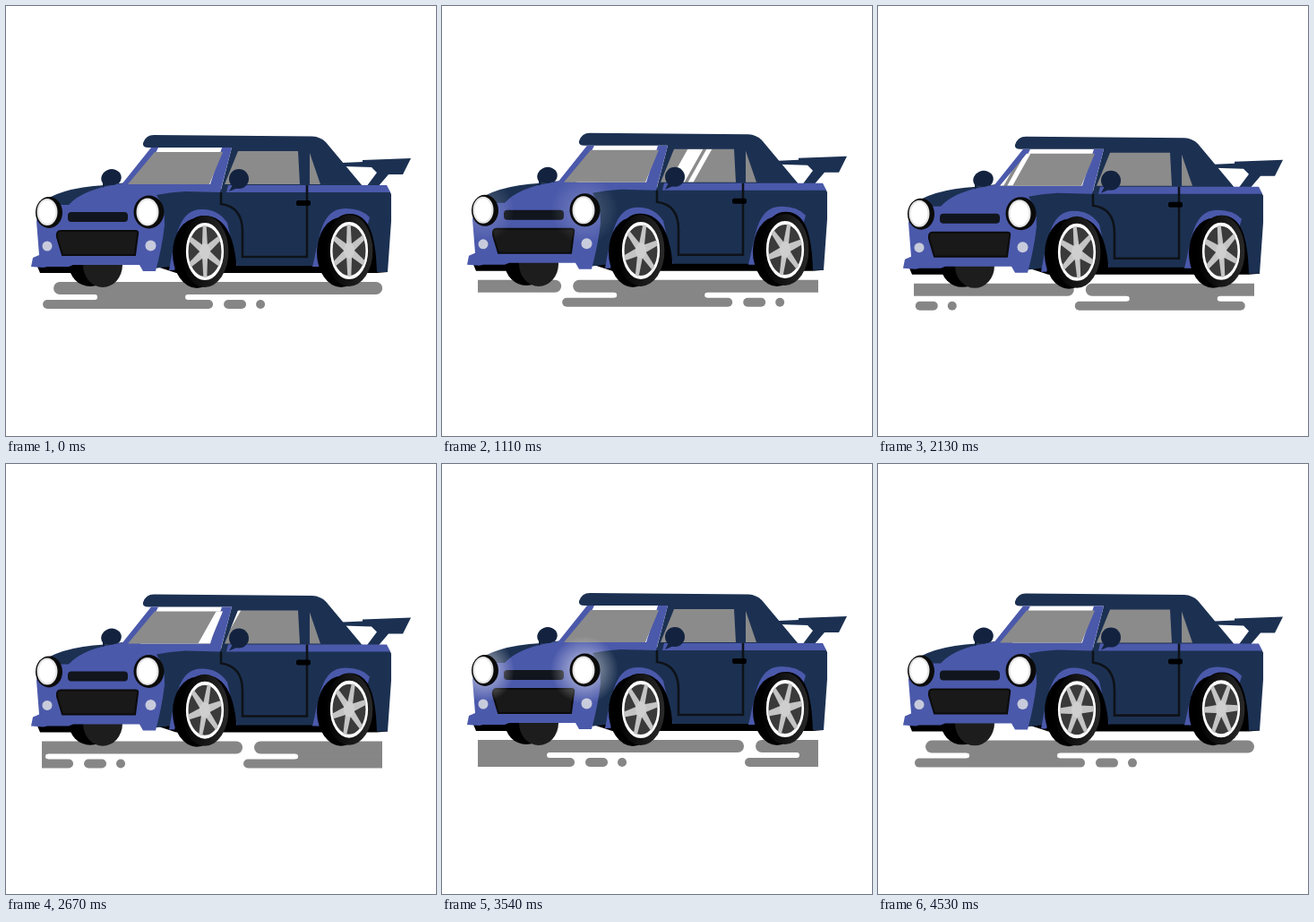
These frames come from a looping animation (480x480 px, 4560 ms). An HTML page:

```html
<!DOCTYPE html>
<html>
<head>
<meta charset="utf-8">
<style>
  html, body { margin: 0; width: 100%; height: 100%; overflow: hidden; background: #fff }
  svg { display: block; width: 100vw; height: 100vh }
  .navy { fill: #1c3152 }
  .deep { fill: #13233f }
  .blue { fill: #4b59ab }
  .glass { fill: #8b8b8b }
  .line { fill: none; stroke: #0e1218; stroke-width: 2.6 }
</style>
</head>
<body>
<svg viewBox="0 0 480 480">
  <defs>
    <clipPath id="road"><path d="M40 300H420V345H40Z"/></clipPath>
    <clipPath id="panes">
      <path d="M166 163H242L227 199H136Z M259 162H326L328 199H244Z"/>
    </clipPath>
    <radialGradient id="beam">
      <stop offset="0" stop-color="#fff"/>
      <stop offset=".4" stop-color="#fff" stop-opacity=".75"/>
      <stop offset="1" stop-color="#fff" stop-opacity="0"/>
    </radialGradient>
    <linearGradient id="tyre">
      <stop offset="0" stop-color="#000"/>
      <stop offset="1" stop-color="#292929"/>
    </linearGradient>
    <g id="strip" fill="#868686">
      <rect x="53" y="308" width="367" height="14" rx="7"/>
      <path d="M99 321v1a3 3 0 0 1 0 6v1H203v-1a3 3 0 0 1 0-6v-1Z"/>
      <rect x="41" y="328" width="190" height="10" rx="5"/>
      <rect x="243" y="328" width="25" height="10" rx="5"/>
      <circle cx="284" cy="333" r="5"/>
    </g>
    <g id="wheel">
      <ellipse cx="-9" cy="2" rx="27" ry="39" fill="#000"/>
      <g transform="scale(.66 1)">
        <circle r="40" fill="url(#tyre)"/>
        <circle r="30" fill="#3a3a3a" stroke="#fff" stroke-width="4"/>
        <g id="spokes"></g>
        <circle r="9" fill="#cfcfcf"/>
      </g>
    </g>
  </defs>

  <g class="bounce">
    <g clip-path="url(#road)">
      <g id="ground"><use href="#strip"/><use href="#strip" x="-380"/></g>
    </g>
  </g>

  <g class="sway">
    <ellipse cx="94" cy="288" rx="24" ry="25"/>
    <ellipse cx="108" cy="289" rx="22" ry="25" fill="#1d1d1d"/>
  </g>

  <g class="bounce">
    <path d="M33 286H75V298H38Z M150 285H426V297L414 298H190Z"/>
    <!-- spoiler -->
    <path class="navy" d="M376 175L398 174V172L452 170L443 188H427L415 202H402L414 186L408 180L376 179Z"/>
    <!-- roof and side -->
    <path class="navy" d="M153 153Q156 144 165 144L342 145.5Q351 146 357 152L398 201H425L430 210V240L426 297H414L340 290H190L165 293L150 250V205H240L252 158H159Q152 158 153 153Z"/>
    <path class="navy" d="M36 222Q58 203 110 200L135 197V230H36Z"/>
    <path class="blue" d="M162 158H170L150 199H228L241 158H252L239 208L200 207Q182 208 168 211Q178 225 177 245Q174 270 167 296H153L149 289H75L70 291H46L42 292L28 291L30 281L37 278L34 240L40 222H70Q86 204 130 198Z"/>
    <path class="blue" d="M248 200H425L429 208H246Z"/>
    <path class="glass" d="M166 163H242L227 199H136Z M259 162H326L328 199H244Z M339 164L351 199H339Z"/>
    <g clip-path="url(#panes)">
      <path id="glint" fill="#fff" d="M0 199L23 158H40L17 199Z M21 199L44 158H50L27 199Z"/>
    </g>
    <path class="line" d="M240 208V221Q264 224 264 252V280H336V200"/>
    <rect x="324" y="217" width="16" height="6" rx="2"/>
    <!-- wheel arches -->
    <path class="blue" d="M182 295C190 255 193 227 219 227Q237 227 247 242L258 290L240 294Z M342 291C350 262 350 226 379 226Q397 226 406 236L390 291Z"/>
    <path d="M188 296C196 262 198 234 221 234C247 234 256 262 258 297Z M349 296C357 262 360 232 384 232C406 232 413 258 414 297Z"/>
    <!-- mirrors -->
    <g class="deep">
      <path d="M109 186Q118 178 127 186Q131 192 126 198L119 200H111L108 203V198Q104 192 109 186Z"/>
      <circle cx="260" cy="193" r="11"/>
      <path d="M254 198L249 207L261 202Z"/>
    </g>
    <!-- nose -->
    <rect x="69" y="230" width="67" height="11" rx="4" fill="#11151d"/>
    <path d="M61 251H145Q148 251 147 255L144 278H63L57 258Q56 251 61 251Z" fill="#191919" stroke="#0b0b0b" stroke-width="2"/>
    <g fill="#c8cbdb">
      <circle cx="46" cy="268" r="5.5"/>
      <circle cx="161.500" cy="267.500" r="6"/>
    </g>
    <g id="glow" fill="url(#beam)">
      <ellipse cx="47" cy="230" rx="34" ry="36"/>
      <ellipse cx="159" cy="230" rx="38" ry="38"/>
    </g>
    <g fill="#0b0b0b">
      <ellipse cx="48" cy="230.500" rx="15" ry="17.500"/>
      <ellipse cx="159.500" cy="230" rx="17" ry="18.500"/>
    </g>
    <g fill="#fff" stroke="#e3e3e3" stroke-width="2">
      <ellipse cx="46" cy="230" rx="10.500" ry="14"/>
      <ellipse cx="158" cy="230" rx="11.500" ry="14.500"/>
    </g>
  </g>

  <g class="sway">
    <use href="#wheel" x="222" y="274"/>
    <use href="#wheel" x="383" y="273"/>
  </g>
</svg>
<script>
  const LOOP = 4560, LAST = 4530;
  const $ = id => document.getElementById(id);
  const shift = (el, x, y) => el.setAttribute('transform', `translate(${x} ${y})`);

  // turning points of the suspension: time, height
  const bumps = [
    [0, 0], [150, -2], [390, .6], [660, -2.5], [930, .6], [1180, -2.8], [1380, .6], [1570, -2],
    [1800, 1], [1970, -1.6], [2140, 1.7], [2400, -1], [2640, 1.6], [2900, -2], [3130, .8],
    [3330, -2.8], [3540, 0], [3680, 1.5], [3940, -1.8], [4180, 1.4], [4400, -1], [4530, .6], [LOOP, 0]
  ];

  function bump(t) {
    const i = bumps.findIndex(b => b[0] > t);
    const [t0, y0] = bumps[i - 1], [t1, y1] = bumps[i];
    return y0 + (y1 - y0) * (1 - Math.cos(Math.PI * (t - t0) / (t1 - t0))) / 2;
  }

  function pulse(t, start, length) {
    const p = (t - start) / length;
    return p > 0 && p < 1 ? Math.sin(Math.PI * p) ** 2 : 0;
  }

  $('spokes').innerHTML = [0, 60, 120, 180, 240, 300].map(a =>
    `<path d="M-5 0L-3 -29H3L5 0Z" fill="#c4c4c4" transform="rotate(${a})"/>`).join('');

  function draw() {
    const t = performance.now() % LOOP, y = bump(t);
    document.querySelectorAll('.bounce').forEach(el => shift(el, 0, y));
    document.querySelectorAll('.sway').forEach(el => shift(el, 0, y / 2));
    shift($('ground'), 380 * Math.min(t / LAST, 1), 0);
    // 73 spoke steps per loop
    $('spokes').setAttribute('transform', `rotate(${-60 * 73 * t / LOOP})`);
    shift($('glint'), t < 1800 ? 185 + .152 * (t - 660) : 123 + .169 * (t - 2130), 0);
    $('glow').setAttribute('opacity', .55 * (pulse(t, 150, 1200) + pulse(t, 2960, 1250)));
    requestAnimationFrame(draw);
  }
  draw();
</script>
</body>
</html>
```
